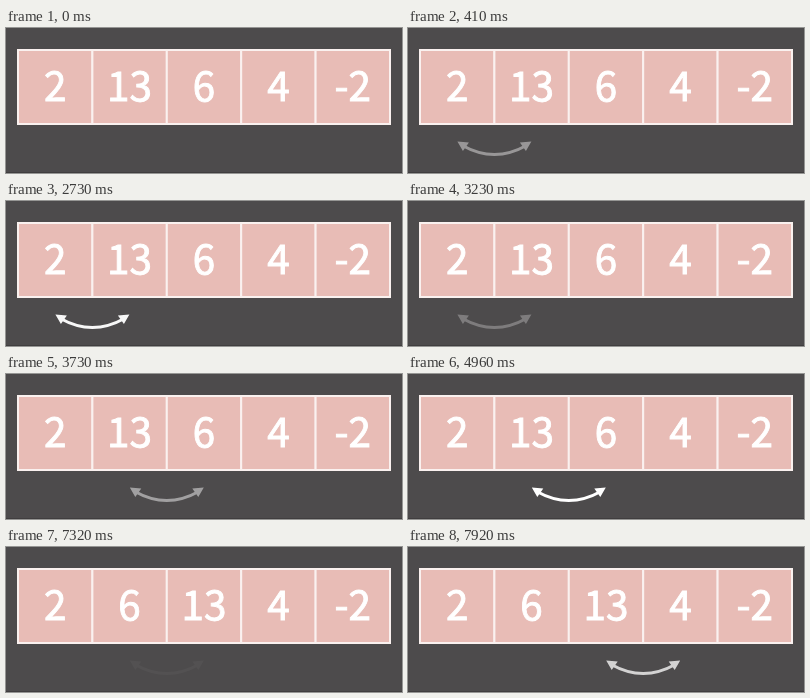
Animation of 396 by 145 pixels, one loop 8000 ms. Source, as an HTML page:

```html
<!DOCTYPE html>
<html lang="en">
<head>
<meta charset="utf-8">
<title>Bubble sort</title>
<style>
  html, body { margin: 0; width: 100%; height: 100%; overflow: hidden; background: #4d4b4c; }
  svg { display: block; width: 396px; height: 145px; }
  rect { fill: #e8bcb6; stroke: #faf1ef; stroke-width: 2; }
  text {
    font: 40.5px "Noto Sans CJK JP", "Noto Sans CJK SC", "Noto Sans", sans-serif;
    fill: #fff; stroke: #fff; stroke-width: .9; text-anchor: middle;
  }
  .shaft { fill: none; stroke: #fff; stroke-width: 3; }
  .head { fill: #fff; }
</style>
</head>
<body>
<svg viewBox="0 0 396 145">
  <defs>
    <g id="arrow">
      <path class="shaft" d="M-32 117.5Q0 135.5 32 117.5"/>
      <path class="head" d="M-37 113.5L-25.5 114.5L-31.5 123Z M37 113.5L25.5 114.5L31.5 123Z"/>
    </g>
  </defs>
  <path d="M0 144.5H396" stroke="#403e3f"/>
  <g id="stage"></g>
</svg>
<script>
const LOOP = 8000, CELL = 74.4, LEFT = 12;
const values = [2, 13, 6, 4, -2];
const swap = { from: 1, to: 2, start: 5180, end: 6020 };
const arrows = [
  { after: 0, show: [60, 900], hide: [2700, 3430] },
  { after: 1, show: [3350, 4150], hide: [6400, 7350] },
  { after: 2, show: [7320, 8120], hide: [9000, 9800] },
];
const stage = document.getElementById("stage");

function add(tag, attributes, content = "") {
  const node = document.createElementNS("http://www.w3.org/2000/svg", tag);
  for (const [key, value] of Object.entries(attributes)) node.setAttribute(key, value);
  node.textContent = content;
  return stage.appendChild(node);
}

const centre = index => LEFT + (index + 0.5) * CELL;
const progress = (t, [start, end]) => Math.min(1, Math.max(0, (t - start) / (end - start)));
const smooth = p => p * p * (3 - 2 * p);

values.forEach((_, i) => add("rect", { x: LEFT + i * CELL, y: 22, width: CELL, height: 74 }));
const labels = values.map((value, i) => add("text", { x: centre(i), y: 73 }, value));
for (const arrow of arrows) {
  const x = LEFT + (arrow.after + 1) * CELL;
  arrow.node = add("use", { href: "#arrow", transform: `translate(${x} 0)` });
}

function draw(now) {
  const t = now % LOOP;
  for (const { node, show, hide } of arrows) {
    node.setAttribute("opacity", progress(t, show) * (1 - progress(t, hide)));
  }
  const p = smooth(progress(t, [swap.start, swap.end]));
  labels[swap.from].setAttribute("x", centre(swap.from + p));
  labels[swap.to].setAttribute("x", centre(swap.to - p));
  requestAnimationFrame(draw);
}
draw(0);
</script>
</body>
</html>
```
